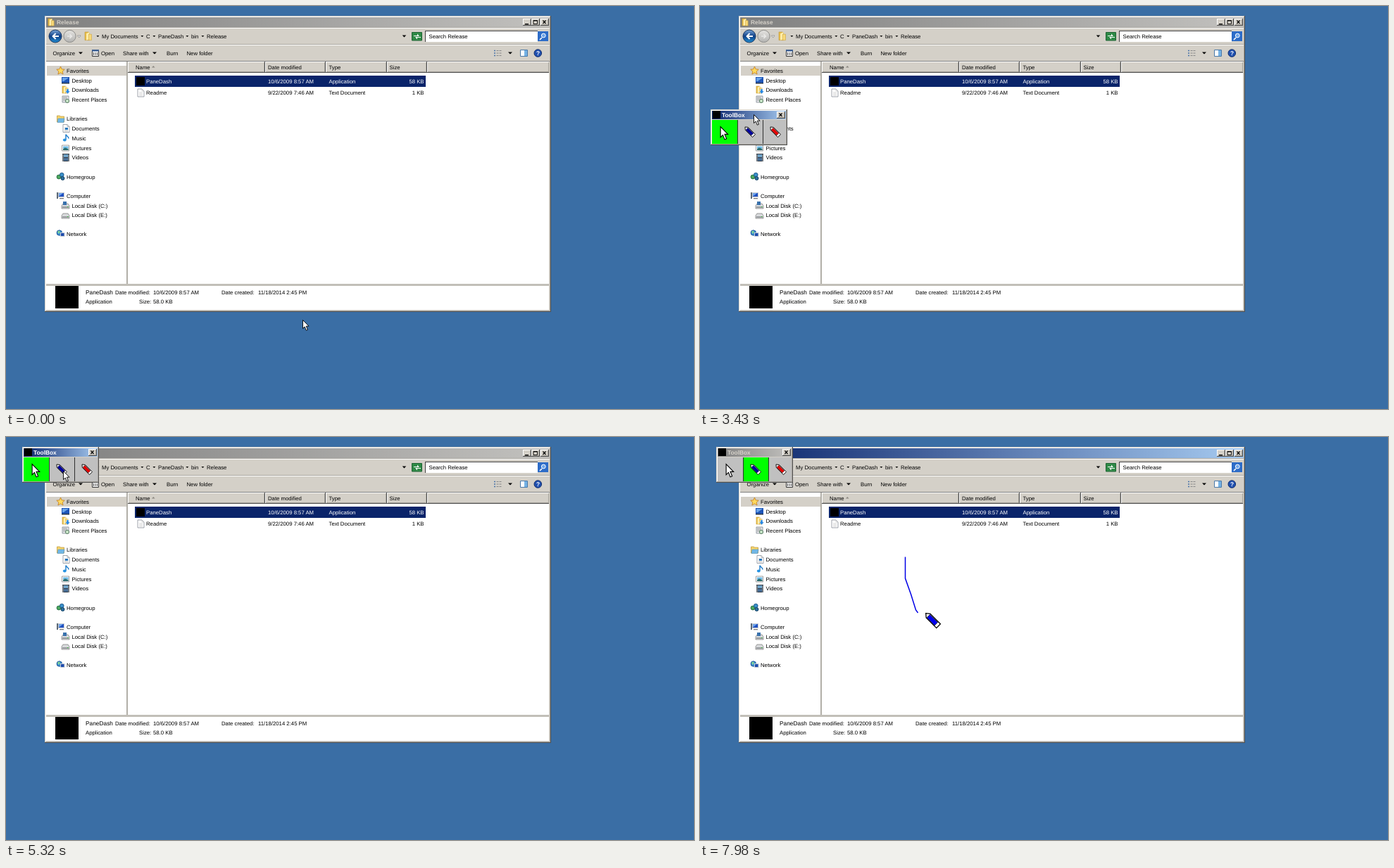
Write an HTML page that moves like this. It is 977 px wide and 573 px high and loops after 8000 ms.

```html
<!DOCTYPE html>
<html lang="en">
<head>
<meta charset="utf-8">
<title>Desktop drawing</title>
<style>
html, body { margin: 0; width: 100%; height: 100%; overflow: hidden; background: #3a6ea5; }
svg { display: block; width: 100%; height: 100%; }
text { font: 7.75px "Liberation Sans", Arial, sans-serif; text-rendering: geometricPrecision; white-space: pre; }
.bold { font-size: 8.35px; font-weight: 700; }
.big { font-size: 8.35px; }
</style>
</head>
<body>
<svg id="stage" viewBox="0 0 977 573" xmlns="http://www.w3.org/2000/svg">
  <defs>
    <linearGradient id="active"><stop stop-color="#0a246a"/><stop offset="1" stop-color="#a6caf0"/></linearGradient>
    <linearGradient id="idle"><stop stop-color="#808080"/><stop offset="1" stop-color="#c2c1be"/></linearGradient>
    <linearGradient id="orb" x2="0" y2="1"><stop stop-color="#7ba8da"/><stop offset=".5" stop-color="#0f3f86"/><stop offset="1" stop-color="#2390d4"/></linearGradient>
    <linearGradient id="pale" x2="0" y2="1"><stop stop-color="#e4e3e0"/><stop offset="1" stop-color="#b4b4b2"/></linearGradient>
    <path id="arrow" d="M.5 .5V12.6L3.2 10L5.3 15.2L7.4 14.3L5.3 9.2H9Z" fill="#fff" stroke="#000" stroke-width=".9"/>
    <g id="pencil">
      <path d="M.7 .7L7 1.4L21.4 15.8L15.8 21.6L1.2 7Z" fill="#fff" stroke="#000" stroke-width="1.3"/>
      <path d="M6.4 2.6L17.6 13.6L13.2 18L2.2 6.8Z" fill="currentColor" stroke="#000" stroke-width=".7"/>
    </g>
  </defs>
</svg>
<script>
const FACE = '#d4d0c8', NAVY = '#0a246a', DARK = '#505050', SHADE = '#a8a59e', APP = 'PaneDash';
const stage = document.getElementById('stage');

function add(tag, attrs, parent = stage) {
  const node = document.createElementNS('http://www.w3.org/2000/svg', tag);
  for (const key in attrs) node.setAttribute(key, attrs[key]);
  return parent.appendChild(node);
}
const rect = (x, y, w, h, fill, parent) => add('rect', { x, y, width: w, height: h, fill }, parent);
const path = (d, fill = 'none', stroke = 'none', width = 1, parent) =>
  add('path', { d, fill, stroke, 'stroke-width': width }, parent);
const disc = (cx, cy, r, fill, stroke = 'none') => add('circle', { cx, cy, r, fill, stroke });
function label(x, y, words, fill = '#000', cls = '', parent) {
  const node = add('text', { x, y, fill, class: cls }, parent);
  node.textContent = words;
  return node;
}
const labelEnd = (x, y, words, fill) => label(x, y, words, fill).setAttribute('text-anchor', 'end');

// Raised box with light top-left and dark bottom-right edges.
function raised(x, y, w, h, fill, parent) {
  rect(x, y, w, h, DARK, parent);
  rect(x, y, w - 1, h - 1, '#fff', parent);
  rect(x + 1, y + 1, w - 2, h - 2, SHADE, parent);
  rect(x + 1, y + 1, w - 3, h - 3, fill, parent);
}
function frame(x, y, w, h, fill, parent) {
  rect(x, y, w, h, DARK, parent);
  rect(x, y, w - 1, h - 1, FACE, parent);
  rect(x + 1, y + 1, w - 2, h - 2, SHADE, parent);
  rect(x + 1, y + 1, w - 3, h - 3, '#fff', parent);
  rect(x + 2, y + 2, w - 4, h - 4, fill, parent);
}
// Sunken line: shade above, highlight below.
function etched(y) {
  rect(57, y, 715, 1, SHADE);
  rect(57, y + 1, 715, 1, '#fff');
}
function closeButton(x, y, parent) {
  raised(x, y, 12, 10, FACE, parent);
  path(`M${x + 3.5} ${y + 2.5}l4 4.5m0-4.5l-4 4.5`, 'none', '#000', 1.2, parent);
}
const dropArrow = (x, y, r = 3) => path(`M${x - r} ${y - r / 2}h${2 * r}l${-r} ${r}z`, '#000');

function folder(x, y, s = 1) {
  const g = add('g', { transform: `translate(${x} ${y}) scale(${s})` });
  path('M1 1h5l1 1v10h-6z', '#e8bd4a', '#b98d27', .5, g);
  path('M3 3l4-2v10l-4 1z', '#fff0b0', 'none', 1, g);
  path('M6 4h4v8h-4z', '#f7d877', '#c69c38', .5, g);
}
function page(x, y, ink) {
  path(`M${x} ${y}h6l3 3v8h-9z`, '#fff', '#8a8f98', .8);
  path(`M${x + 6} ${y}v3h3M${x + 2} ${y + 5}h5m-5 2h5m-5 2h5`, 'none', ink, .6);
}
function monitor(x, y) {
  rect(x, y, 9, 7, '#c8ccd2');
  rect(x + 1, y + 1, 7, 5, '#1f4fc0');
  path(`M${x + 1} ${y + 1}h6l-5 4h-1z`, '#6fa4ec');
  rect(x + 2, y + 8, 6, 1.3, '#777');
}
function drive(x, y) {
  path(`M${x} ${y + 4}l2-3h7l2 3v4h-11z`, '#d9dbdd', '#777', .7);
  rect(x + 1, y + 5, 9, 2, '#9a9da1');
  rect(x + 8, y + 5, 1.5, 1, '#35c435');
}

// Explorer window
rect(0, 0, 977, 573, '#3a6ea5');
frame(55, 14, 719, 421, FACE);
const mainBar = rect(57, 16, 715, 14, 'url(#idle)');
folder(59, 17, .92);
const mainTitle = label(72, 26, 'Release', FACE, 'bold');
raised(734, 18, 12, 10, FACE);
rect(737, 25, 5, 1.4, '#000');
raised(746, 18, 12, 10, FACE);
path('M749 20.5h5.5v5h-5.5zM749 21h5.5', 'none', '#000', .9);
closeButton(759, 18);

// Address row
etched(30);
etched(54);
disc(70, 43, 9, 'url(#orb)', '#173560');
path('M75 43h-8m3.6-4l-4 4l4 4', 'none', '#fff', 2);
disc(90.5, 43, 8.6, 'url(#pale)', '#8c8c8a');
path('M87 43h6m-2.6-3l3 3l-3 3', 'none', '#e9e9e7', 1.6);
path('M101.5 42h4.5l-2.2 3z', '#eee', '#777', .6);
folder(111, 36, 1.05);
for (const [x, name] of [[136, 'My Documents'], [199, 'C'], [216, APP], [263, 'bin'], [285, 'Release']]) {
  label(x, 45.6, name);
  dropArrow(x - 5.6, 43, 2);
}
dropArrow(565.5, 43, 2.8);
path('M576.5 37.5h14v11.5h-14z', '#2f8a47', '#1f6434');
path('M579 42h5v-2.4l3 3.4h-8zM589 45h-5v2.4l-3-3.4h8z', '#fff');
rect(595, 35, 160, 16, '#404040');
rect(596, 36, 159, 15, '#fff');
label(600.5, 45.8, 'Search Release');
rect(755, 36, 15, 14, '#2d6cc8');
path('M761 45l-3 3', 'none', '#fff', 1.6);
disc(763.3, 42, 2.9, '#6ea6ea', '#fff');

// Command row
for (const [x, name] of [[66.5, 'Organize'], [135, 'Open'], [166, 'Share with'], [228, 'Burn'], [256.5, 'New folder']])
  label(x, 69.7, name);
dropArrow(106, 67);
dropArrow(211, 67);
dropArrow(716, 67);
path('M122.5 62.5h9v9h-9z', '#fff', '#333');
rect(122, 62, 10, 2.5, '#3d5f92');
path('M124.5 66v4m2.5-4v4m2.5-4v4', 'none', '#333', .9);
path('M693 63.5h2m-2 3.5h2m-2 3.5h2', 'none', '#4a73a8', 1.5);
path('M696.5 63.5h3m1 0h3m-7 3.5h3m1 0h3m-7 3.5h3m1 0h3', 'none', '#888', 1);
path('M730.5 62.5h10v9h-10z', '#fff', '#4878a8');
rect(736, 63, 4, 8, '#74b1e4');
disc(755.3, 67, 5.3, '#2050b0', '#15306c');
label(753, 70, '?', '#fff', 'bold');

// Navigation pane
rect(57, 78, 715, 1, '#808080');
rect(57, 79, 715, 316, '#fff');
rect(171, 79, 2, 316, '#b2afa8');
rect(58, 85, 113, 14, FACE);
const places = [
  [86, 92, 'Favorites'], [93.5, 106, 'Desktop'], [93.5, 119.5, 'Downloads'], [93.5, 133.3, 'Recent Places'],
  [86, 160.5, 'Libraries'], [93.5, 174.3, 'Documents'], [93.5, 188, 'Music'], [93.5, 201.7, 'Pictures'],
  [93.5, 215.3, 'Videos'], [86, 242.7, 'Homegroup'], [86, 270, 'Computer'],
  [93.5, 283.7, 'Local Disk (C:)'], [93.5, 297.4, 'Local Disk (E:)'], [86, 324.6, 'Network']
];
for (const [x, y, name] of places) label(x, y + 2.8, name);

path('M77.5 86l1.7 3.8l4 .4l-3 2.8l.9 4l-3.6-2.1l-3.6 2.1l.9-4l-3-2.8l4-.4z', '#ffd95c', '#c07a20', .8);
rect(79, 101, 11, 9, '#1e55b8');
path('M80 102h9l-7 5h-2z', '#69a3e8');
rect(79, 109, 11, 1.5, '#27374e');
folder(79, 113, .92);
path('M86 118h3v3h2l-3.5 4l-3.5-4h2z', '#2786e0', '#fff', .4);
path('M80 128h9v9h-9z', '#e8ebee', '#7d858e', .8);
path('M81 130h6m-6 2h6m-6 2h4', 'none', '#777', .7);
disc(87, 135, 2.6, '#c9e6c9', '#5b7e66');
path('M72.5 156h4l1 1h5v8h-10z', '#f3d36e', '#ba922f', .7);
path('M74 160h9l-1 5.5h-9z', '#71b7e6', '#478db8', .5);
page(81, 168.5, '#888');
rect(84, 173, 4, 3, '#2878bd');
path('M85 183v7', 'none', '#1477ca', 1.4);
path('M85 182.5c1 3 4 3 4 6', 'none', '#1477ca', 1.4);
add('ellipse', { cx: 83.3, cy: 190.5, rx: 2.4, ry: 2, fill: '#2692e2' });
path('M79.5 198h10v8h-10z', '#fff', '#888', .8);
rect(81, 199.5, 7.5, 3, '#70bce9');
path('M81 205v-2l3-1.5l4.5 1.5v2z', '#2a6d70');
rect(80, 210, 10, 11, '#2e3743');
rect(82, 211, 6, 4, '#6fa4ca');
rect(82, 216, 6, 4, '#476e97');
path('M81 211v10m8-10v10', 'none', '#ddd', .8);
disc(75, 243, 2.9, '#4ea95f', '#287047');
disc(79.3, 240, 2.8, '#3b92cb', '#1c578c');
disc(80.5, 245, 2.5, '#2d6e9e', '#174566');
monitor(74, 265);
rect(72, 265, 2, 9, '#5b6876');
drive(79, 280);
rect(81, 278, 5, 5, '#3a72ad');
drive(79, 294);
disc(75.8, 322.5, 3.7, '#3e8fd0', '#1c569c');
path('M73 321c2-2 3-1 4 0l-2 3z', '#82d597');
rect(77, 322, 6.5, 6, '#ccd1d7');
rect(78, 323, 4.5, 4, '#1e4bad');

// File list
const columns = [173, 368, 454, 541, 598, 772];
for (let i = 1; i < columns.length; i++)
  raised(columns[i - 1], 79, columns[i] - columns[i - 1], 16, FACE);
for (const [x, name] of [[184, 'Name'], [372, 'Date modified'], [458.5, 'Type'], [544.5, 'Size']])
  label(x, 89.8, name);
path('M207 87.5l2.3-2.5l2.3 2.5z', '#8b8881');
rect(183, 99, 413, 16, NAVY);
rect(185, 101, 12, 12, '#000');
page(187, 118, '#bbb');
const files = [
  [110, '#fff', APP, '10/6/2009 8:57 AM', 'Application', '58 KB'],
  [126, '#000', 'Readme', '9/22/2009 7:46 AM', 'Text Document', '1 KB']
];
for (const [y, ink, name, date, type, size] of files) {
  label(199, y, name, ink);
  label(372, y, date, ink);
  label(458.5, y, type, ink);
  labelEnd(593.5, y, size, ink);
}

// Details pane
rect(57, 395, 715, 3, '#c2bfb8');
rect(57, 398, 715, 34, '#fff');
rect(771, 79, 1, 353, FACE);
rect(70, 398, 33, 32, '#000');
label(113, 409.8, APP, '#000', 'big');
label(155, 409.8, 'Date modified:');
label(209, 409.8, '10/6/2009 8:57 AM');
label(306, 409.8, 'Date created:');
label(358, 409.8, '11/18/2014 2:45 PM');
label(113, 422.8, 'Application');
label(189, 422.8, 'Size:');
label(209, 422.8, '58.0 KB');

// Toolbox
const box = add('g', {});
frame(0, 0, 109, 51, '#c0c0c0', box);
const boxBar = rect(2, 2, 105, 12, 'url(#active)', box);
rect(3, 2, 11, 11, '#000', box);
const boxTitle = label(16, 11, 'ToolBox', '#fff', 'bold', box);
closeButton(94, 3, box);
rect(2, 14, 105, 1, FACE, box);
const pick = rect(2, 15, 36, 34, '#0f0', box);
path('M38.5 15v34m36-34v34', 'none', '#303030', 1, box);
add('use', { href: '#arrow', transform: 'translate(13.5 24) scale(1.24)' }, box);
const bluePen = add('use', { href: '#pencil', transform: 'translate(48.5 24.5) scale(.7)' }, box);
const redPen = add('use', { href: '#pencil', transform: 'translate(84.5 24.5) scale(.7)' }, box);

const stroke = path('', 'none', '#0000e6', 1.5);
const arrow = add('use', { href: '#arrow' });
const pen = add('use', { href: '#pencil', color: '#0000f0' });

// Keyframes: time, x, y
const arrowStart = [[560, 421, 446], [700, 402, 410], [1050, 255, 150], [1190, 235, 110], [1750, 235, 110], [1820, 209, 110]];
const boxMove = [[3290, -48, 153], [3360, -14, 154], [3430, 15, 147], [3570, 62, 132], [3710, 92, 116],
  [3780, 97, 109], [3850, 88, 99], [3990, 63, 58], [4060, 47, 41], [4200, 28, 20], [4270, 23, 14]];
const arrowPick = [[4760, 84, 21], [4900, 108, 42], [5040, 90, 66], [5180, 60, 52], [5320, 81, 48]];
const penMove = [[5740, 81, 50], [5810, 150, 90], [5950, 318, 185], [6090, 318, 185], [6230, 338, 201], [6300, 338, 201],
  [6440, 318, 192], [6650, 291, 170], [7630, 291, 170], [7700, 291, 176], [7770, 291, 201],
  [7840, 299, 223.5], [7910, 309, 250], [7980, 320, 250]];

function along(keys, t) {
  if (t <= keys[0][0]) return keys[0].slice(1);
  for (let i = 1; i < keys.length; i++) {
    const [t0, x0, y0] = keys[i - 1], [t1, x1, y1] = keys[i];
    if (t <= t1) {
      const k = (t - t0) / (t1 - t0);
      return [x0 + (x1 - x0) * k, y0 + (y1 - y0) * k];
    }
  }
  return keys[keys.length - 1].slice(1);
}
function place(node, [x, y], visible) {
  node.setAttribute('transform', `translate(${Math.round(x)} ${Math.round(y)})`);
  node.setAttribute('visibility', visible ? 'visible' : 'hidden');
}
function setBar(bar, title, on) {
  bar.setAttribute('fill', on ? 'url(#active)' : 'url(#idle)');
  title.setAttribute('fill', on ? '#fff' : FACE);
}

const TICK = 70, LOOP = 8000;
function draw(now) {
  const t = Math.floor((now % LOOP) / TICK) * TICK;
  const drawing = t >= 7490, picked = t >= 5530, open = t >= 3290;
  setBar(mainBar, mainTitle, drawing || t === 1470);
  setBar(boxBar, boxTitle, !drawing);

  const [bx, by] = along(boxMove, t).map(Math.round);
  place(box, [bx, by], open);
  pick.setAttribute('x', picked ? 39 : 2);
  const shifted = t >= 3710 && t <= 4060;
  bluePen.setAttribute('color', shifted ? '#1010e6' : '#0000a0');
  redPen.setAttribute('color', shifted ? '#800808' : '#e60000');

  const tip = !open ? along(arrowStart, t) : t < 4830 ? [bx + 61, by + 7] : along(arrowPick, t);
  place(arrow, tip, !picked && (t < 1890 || open));
  place(pen, along(penMove, t), picked);

  // The ink trails the pencil by one tick.
  let d = '';
  if (t >= 7770) {
    d = 'M291.5 170.5';
    for (let s = 7700; s < t; s += TICK) {
      if (s === 7910) d += 'L306.5 246';
      const [x, y] = along(penMove, s);
      d += `L${x + .5} ${y}`;
    }
  }
  stroke.setAttribute('d', d);
}

const start = performance.now();
function loop() {
  draw(performance.now() - start);
  requestAnimationFrame(loop);
}
draw(0);
requestAnimationFrame(loop);
</script>
</body>
</html>
```
